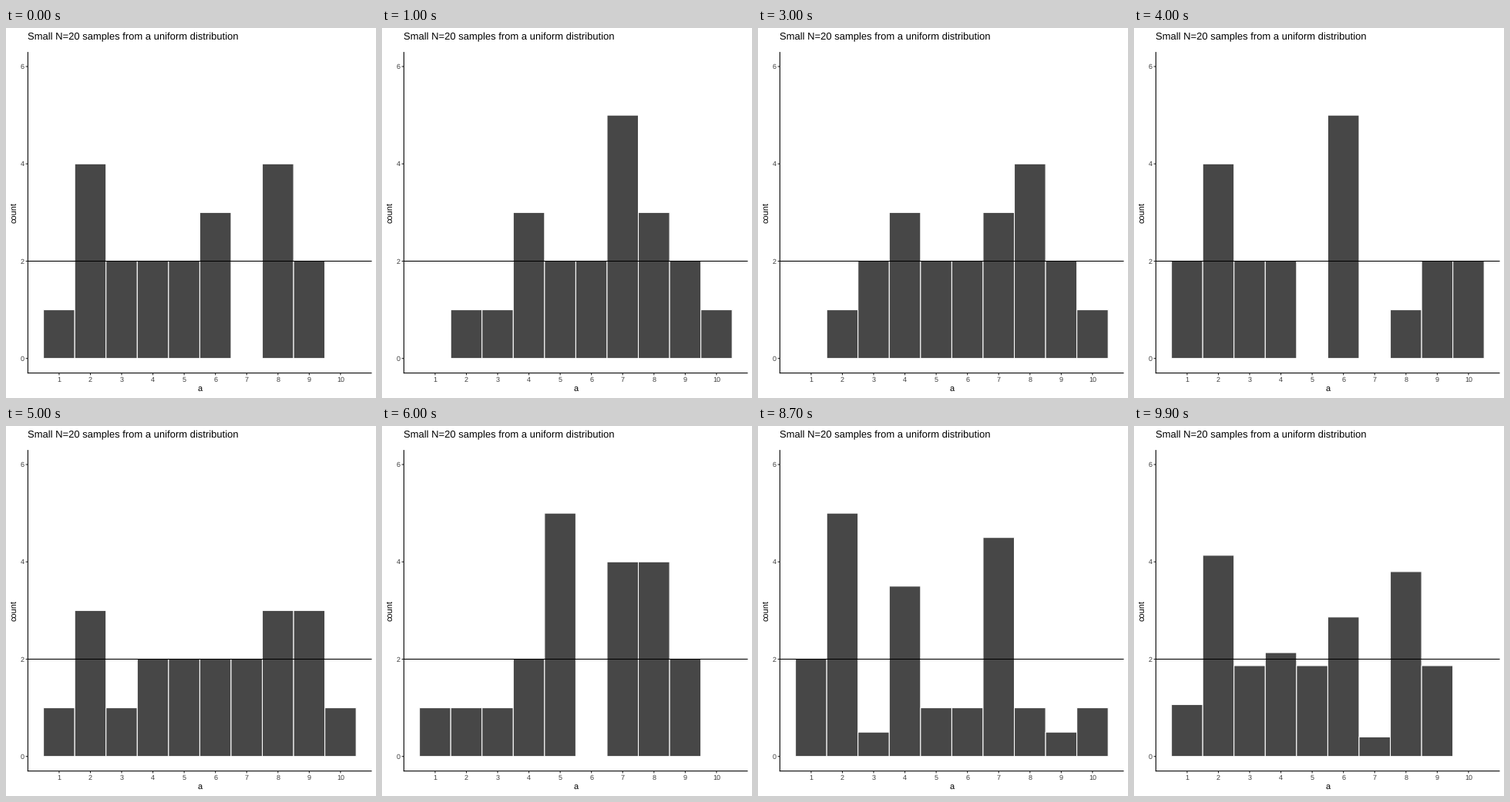
Recreate the animation shown at these times as a matplotlib script. Size 480 by 480 pixels, loop 10 s.

```python
import math

import matplotlib.pyplot as plt
import numpy as np
from matplotlib.animation import FuncAnimation

plt.rcParams.update({
    "font.family": "Liberation Sans",
    "text.hinting": "none",
    "text.hinting_factor": 1,
})

SIZE = 480
DPI = 72
FRAMES_PER_SAMPLE = 10
LEFT, RIGHT, TOP, BOTTOM = 28.4, 474.5, 31.1, 447.6
BIN_WIDTH = 40.56
TICK = 2.75
LINE = 1.07

# Counts for values 1 to 10, one row per sample of 20.
SAMPLES = np.array([
    [1, 4, 2, 2, 2, 3, 0, 4, 2, 0],
    [0, 1, 1, 3, 2, 2, 5, 3, 2, 1],
    [1, 1, 2, 3, 2, 1, 4, 2, 2, 2],
    [0, 1, 2, 3, 2, 2, 3, 4, 2, 1],
    [2, 4, 2, 2, 0, 5, 0, 1, 2, 2],
    [1, 3, 1, 2, 2, 2, 2, 3, 3, 1],
    [1, 1, 1, 2, 5, 0, 4, 4, 2, 0],
    [3, 4, 0, 3, 2, 0, 2, 1, 2, 3],
    [2, 4, 1, 3, 2, 1, 3, 1, 1, 2],
    [2, 6, 0, 4, 0, 1, 6, 1, 0, 0],
])


def x_pos(value):
    return 68.9 + BIN_WIDTH * (value - 1)


def y_pos(count):
    return 428.7 - 63.12 * count


def counts_at(frame):
    """Hold each sample, then ease to the next with a sine in-out curve."""
    index, step = divmod(frame, FRAMES_PER_SAMPLE)
    last_hold = 3 if index == 0 else 4
    t = max(0, step - last_hold) / (FRAMES_PER_SAMPLE - last_hold)
    eased = (1 - math.cos(math.pi * t)) / 2
    start = SAMPLES[index]
    end = SAMPLES[(index + 1) % len(SAMPLES)]
    return start + (end - start) * eased


fig = plt.figure(figsize=(SIZE / DPI, SIZE / DPI), dpi=DPI, facecolor="white")
ax = fig.add_axes([0, 0, 1, 1])
ax.set_xlim(0, SIZE)
ax.set_ylim(SIZE, 0)
ax.axis("off")


def line(x0, y0, x1, y1, color="black"):
    ax.plot([x0, x1], [y0, y1], color=color, lw=LINE, zorder=3,
            solid_capstyle="butt", snap=False)


def label(x, y, text, size, color="black", ha="center", rotation=0):
    ax.text(x, y, text, fontsize=size, color=color, ha=ha, va="baseline",
            rotation=rotation, rotation_mode="anchor")


bars = [
    ax.add_patch(plt.Rectangle(
        (x_pos(value) - BIN_WIDTH / 2, y_pos(0)), BIN_WIDTH, 0,
        facecolor="#474747", edgecolor="white", lw=LINE, snap=False, zorder=2))
    for value in range(1, 11)
]

line(LEFT, y_pos(2), RIGHT, y_pos(2))
line(LEFT, TOP, LEFT, BOTTOM + LINE / 2)
line(LEFT - LINE / 2, BOTTOM, RIGHT, BOTTOM)

for value in range(1, 11):
    x = x_pos(value)
    line(x, BOTTOM, x, BOTTOM + TICK, "#222222")
    label(x, 458.9, str(value), 8.8, "#3c3c3c")

for count in (0, 2, 4, 6):
    y = y_pos(count)
    line(LEFT - TICK, y, LEFT, y, "#222222")
    label(23.4, y + 3.1, str(count), 8.8, "#3c3c3c", ha="right")

label(LEFT, 15.1, "Small N=20 samples from a uniform distribution", 13.2, ha="left")
label(251.4, 472, "a", 11)
label(13.4, 239.4, "count", 11, rotation=90)


def update(frame):
    for bar, count in zip(bars, counts_at(frame)):
        bar.set_y(y_pos(count))
        bar.set_height(y_pos(0) - y_pos(count))
    return bars


anim = FuncAnimation(fig, update, frames=len(SAMPLES) * FRAMES_PER_SAMPLE,
                     interval=100, repeat=True, repeat_delay=0)
plt.show()
```
